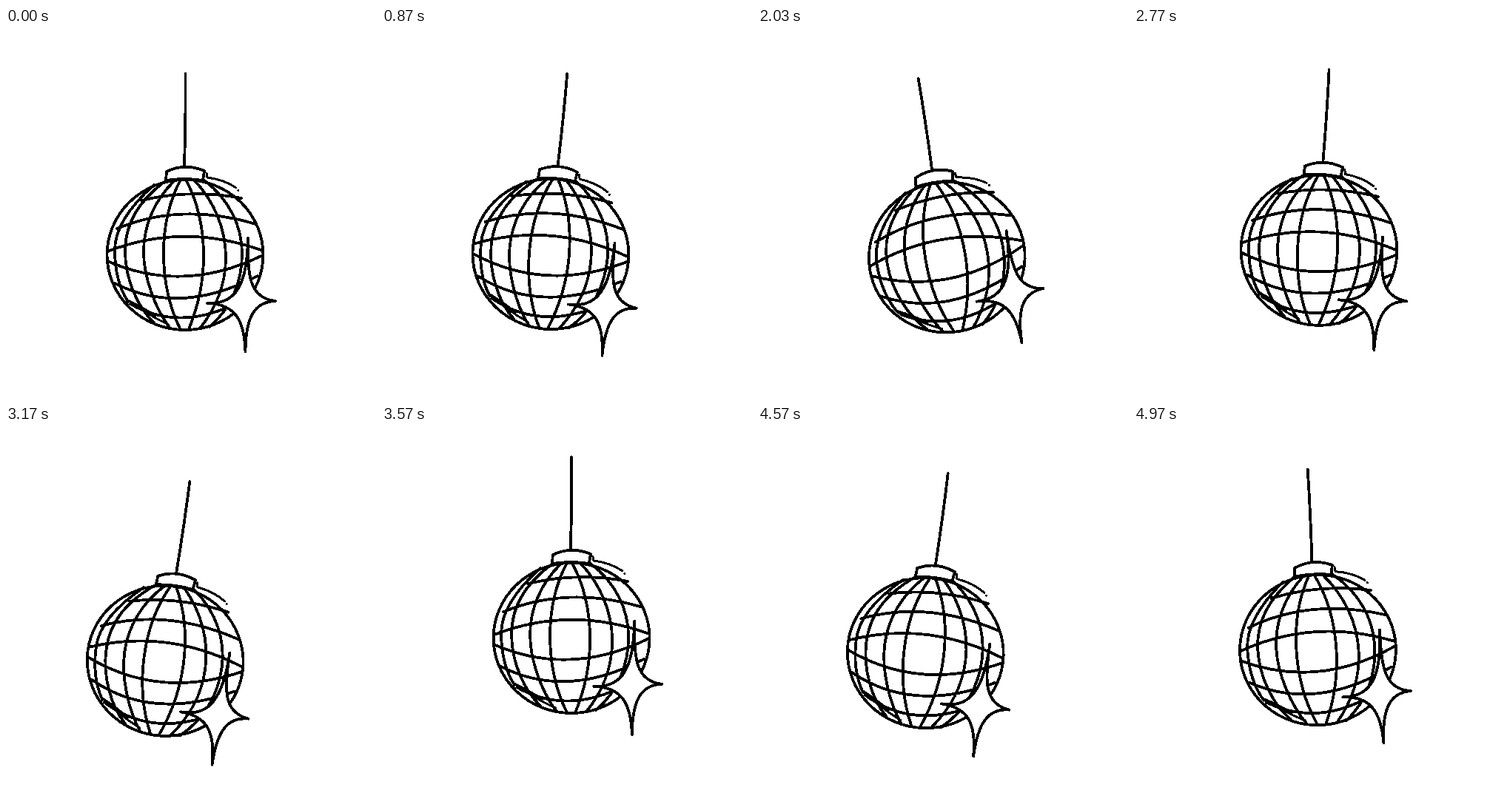
Recreate the animation shown at these times as an HTML page. Size 500 by 500 pixels, loop 5010 ms.

```html
<!DOCTYPE html>
<html>
<head>
<meta charset="utf-8">
<style>
html, body { margin: 0; height: 100%; overflow: hidden; background: #fff; }
svg { display: block; width: 100%; height: 100%; }
path, ellipse { fill: none; stroke: #000; stroke-width: 3.8; stroke-linecap: round; stroke-linejoin: round; }
.thin { stroke-width: 3; }
.solid { fill: #fff; }
</style>
</head>
<body>
<svg viewBox="0 0 500 500" shape-rendering="crispEdges">
<g id="ball">
  <path d="M242.5 62Q243 120 241 186"/>
  <ellipse cx="242" cy="306.5" rx="105.5" ry="101.5"/>
  <!-- parallels -->
  <path d="M183 233Q250 217 318 230M150 271Q237 235 338 265M137 302Q240 262 347 301
    M137 315Q240 360 347 307M147 345Q235 390 340 335M168 373Q232 409 305 375"/>
  <!-- meridians -->
  <path d="M200 212C163 245 147 275 147 300S152 350 165 370
    M215 207C178 235 161 265 161 302S178 378 200 398
    M228 206C200 233 186 268 186 302S201 378 221 405
    M236 205C220 235 213 270 213 304S220 375 235 406
    M243 205C259 235 267 272 267 308S259 378 247 407
    M254 205C282 235 297 272 297 310S284 378 262 406
    M268 206C302 232 319 268 319 305S305 378 275 404"/>
  <path class="solid" d="M217 194Q242 182 268 193L266 206Q241 202 216 206Z"/>
  <path class="thin" d="M271 196L272 202Q295 205 311 216M314 219.5v.1M159 361v.1M162 366Q188 386 220 401M165 368Q182 376 202 389"/>
  <path class="solid" d="M327 284C326 335 329 365 364 369C336 370 324 390 323.5 437C322 395 310 373 272 372C312 374 326 345 327 284"/>
</g>
</svg>
<script>
// seconds, x shift, y shift, degrees
const keys = [
  [0, 0, 0, 0], [.2, -8, -20, 9], [.42, 2, -12, -1], [.6, 5, -10, -3.3],
  [.87, -9.3, 0, 5.2], [.98, -20, -2, 6], [1.07, -19, -1, 4], [1.3, 6, -20, -6],
  [1.5, -5, -4, 0], [1.7, -18, 0, 6], [1.87, -5, 2, -4], [2.03, 4, 2.7, -9.2],
  [2.13, 6, 5, -7.2], [2.35, 4, 14, 5], [2.67, 11, 4, 4], [2.77, 11, -6, 3],
  [2.9, 5, -16, -1.5], [3.2, -20, 13.5, 8], [3.38, -3, 0, 3], [3.57, 14, -20, -.2],
  [3.7, 10, -12, -5], [3.95, -18.5, 8.5, 7.5], [4.17, 8.1, -11, 6.7], [4.3, 14, -9, -1],
  [4.4, 10, -6, -5], [4.6, -10, 2, 8], [4.8, -2, -1, 3], [4.9, 2, -7, -.5], [4.97, 3.2, -4, -3.5]
];
const ball = document.getElementById('ball');

// Slope through a key; flat at local extremes.
function slope(i, c) {
  const a = keys[i - 1], b = keys[i], d = keys[i + 1];
  if (!a) return (d[c] - b[c]) / (d[0] - b[0]);
  if (!d) return (b[c] - a[c]) / (b[0] - a[0]);
  return (b[c] - a[c]) * (d[c] - b[c]) <= 0 ? 0 : (d[c] - a[c]) / (d[0] - a[0]);
}

function pose(t) {
  let i = 0;
  while (i < keys.length - 2 && keys[i + 1][0] <= t) i++;
  const a = keys[i], b = keys[i + 1], h = b[0] - a[0];
  const u = Math.min(1, (t - a[0]) / h), v = 1 - u;
  return [1, 2, 3].map(c =>
    v * v * ((1 + 2 * u) * a[c] + u * h * slope(i, c)) +
    u * u * ((1 + 2 * v) * b[c] - v * h * slope(i + 1, c)));
}

function draw(now) {
  const step = Math.min(149, Math.floor((now % 5010 + 5) * .03));
  const [x, y, r] = pose(step / 30);
  ball.setAttribute('transform', `translate(${x} ${y}) rotate(${r} 250 250)`);
  requestAnimationFrame(draw);
}
draw(performance.now());
</script>
</body>
</html>
```
